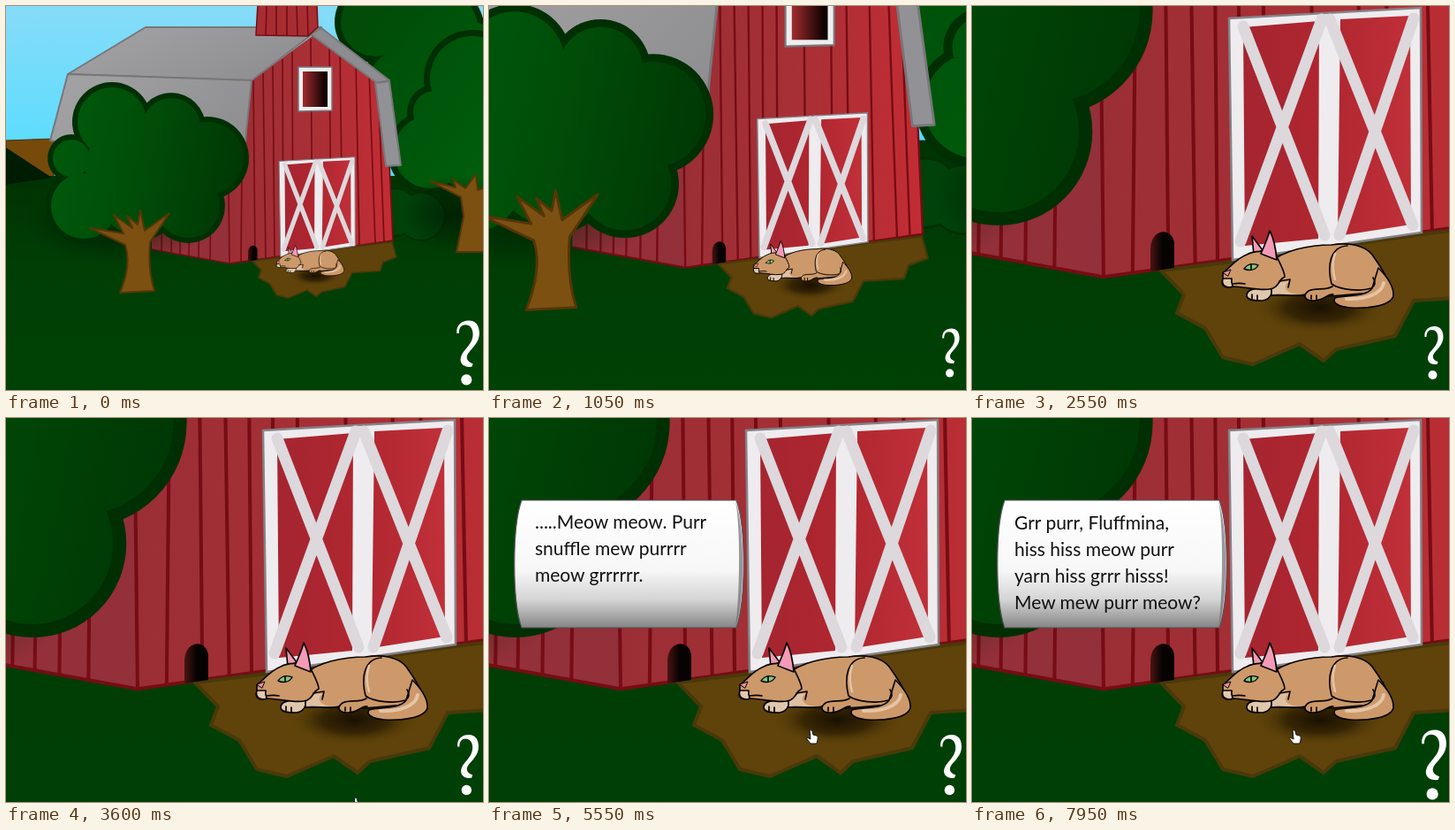
An HTML page that plays this animation: 540 by 434 pixels, repeating every 8 s.

```html
<!DOCTYPE html>
<html lang="en">
<head>
<meta charset="utf-8">
<title>Barn cat</title>
<style>
html, body { margin: 0; width: 100%; height: 100%; overflow: hidden; background: #003f05; }
svg { display: block; width: 100vw; height: 100vh; }
text { font: 21px Lato, "Open Sans", sans-serif; fill: #111; }
.ink { stroke: #080402; stroke-width: 1.7; stroke-linejoin: round; stroke-linecap: round; }
.seam { stroke: #760c14; stroke-width: 1.6; fill: none; }
.roof { stroke: #77777a; stroke-width: 2; stroke-linejoin: round; }
.wood { fill: #7b5011; stroke: #563507; stroke-width: 2; stroke-linejoin: round; }
</style>
</head>
<body>
<svg viewBox="0 0 540 434" preserveAspectRatio="none">
  <defs>
    <linearGradient id="sky" x2="0" y2="1"><stop stop-color="#86dcf8"/><stop offset="1" stop-color="#52dcff"/></linearGradient>
    <linearGradient id="grass" x2="0" y2="1"><stop stop-color="#003203"/><stop offset=".4" stop-color="#003e05"/><stop offset="1" stop-color="#004206"/></linearGradient>
    <linearGradient id="wall"><stop stop-color="#9b2e35"/><stop offset=".5" stop-color="#a83036"/><stop offset="1" stop-color="#c32c34"/></linearGradient>
    <linearGradient id="roof" x2="1" y2=".5"><stop stop-color="#a4a4a6"/><stop offset="1" stop-color="#8f8f92"/></linearGradient>
    <linearGradient id="panel"><stop stop-color="#a52530"/><stop offset=".5" stop-color="#b02630"/><stop offset="1" stop-color="#c03039"/></linearGradient>
    <linearGradient id="pane"><stop stop-color="#a22c2e"/><stop offset=".85" stop-color="#160303"/><stop offset="1" stop-color="#080000"/></linearGradient>
    <linearGradient id="hole"><stop stop-color="#4a1412"/><stop offset=".5" stop-color="#080303"/></linearGradient>
    <linearGradient id="leaf" gradientUnits="userSpaceOnUse" x1="50" x2="270" y1="150" y2="200"><stop stop-color="#005a0b"/><stop offset=".5" stop-color="#004c08"/><stop offset="1" stop-color="#003704"/></linearGradient>
    <linearGradient id="backLeaf" gradientUnits="userSpaceOnUse" x1="390" x2="550" y1="40" y2="160"><stop stop-color="#004c08"/><stop offset="1" stop-color="#005d0c"/></linearGradient>
    <radialGradient id="shade"><stop stop-color="#120b00" stop-opacity=".9"/><stop offset=".5" stop-color="#1c1200" stop-opacity=".6"/><stop offset="1" stop-color="#5f430a" stop-opacity="0"/></radialGradient>
    <radialGradient id="dim"><stop stop-color="#001a00" stop-opacity=".75"/><stop offset="1" stop-color="#001a00" stop-opacity="0"/></radialGradient>
    <linearGradient id="scroll" x2="0" y2="1"><stop stop-color="#fff"/><stop offset=".55" stop-color="#f7f7f7"/><stop offset=".78" stop-color="#d4d4d4"/><stop offset="1" stop-color="#858585"/></linearGradient>
  </defs>

  <g id="scene">
    <rect width="540" height="200" fill="url(#sky)"/>
    <path d="M0 152 54 150V198L0 161Z" fill="#764a0b" stroke="#4a2e06"/>
    <rect y="192" width="540" height="242" fill="url(#grass)"/>
    <path d="M0 160 52 194 0 202Z" fill="#001c02"/>

    <g id="backTrees"></g>
    <ellipse cx="508" cy="235" rx="60" ry="45" fill="url(#dim)"/>
    <path class="wood" d="M510 278 518 238 515 216 480 198 509 205 506 196 520 206 532 190 534 208 545 204V278Z"/>

    <path d="M165 190H262L253 291 165 275Z" fill="#93303a"/>
    <path id="front" d="M278 84 355 28 430 84 438 265 253 291 254 190Z" fill="url(#wall)"/>
    <path class="seam" id="seams"/>
    <path class="seam" d="M165 275 253 291 438 265 430 90M253 291 252 205"/>
    <path class="roof" fill="url(#roof)" d="M158 24H357L278 84 70 77Z"/>
    <path class="roof" fill="url(#roof)" d="M70 77 278 84 272 142 268 192 50 152Z"/>
    <path class="roof" fill="#8d8d91" d="M345 32 357 25 434 84 420 87Z"/>
    <path class="roof" fill="#929296" d="M418 87 434 85 447 180 430 181Z"/>
    <path d="M285-2H352L353 24 342 34 283 33Z" fill="#a72d33" stroke="#760c14" stroke-width="1.5"/>
    <path class="seam" d="M295 0 294 33M306 0V33M318 0V33M329 0 330 33M341 0 342 33"/>
    <path d="M331 69H369V118L331 119Z" fill="#eee" stroke="#77777a" stroke-width="1.5"/>
    <path d="M336 74H364V114H336Z" fill="url(#pane)"/>

    <!-- The foreground is laid out at full zoom. -->
    <g id="near">
      <path d="M214 299 240 326 232 347 264 364 284 397 318 405 371 382 398 401 412 388 479 373 500 333 580 328 589 302 627 288 615 245 509 258 295 289Z" fill="#5f430a" stroke="#49390a" stroke-width="4" stroke-linejoin="round"/>
      <path d="M202 300 202 274C203 250 228 250 229 269V296Z" fill="url(#hole)"/>
      <path d="M291 14 508 2 509 256 295 287Z" fill="#eeecee" stroke="#858287" stroke-width="2.5"/>
      <path d="M307 24 393 17 392 263 309 271ZM417 15 496 11 497 247 414 260Z" fill="url(#panel)"/>
      <path d="M307 23 399 259M396 15 304 266M405 15 499 248M500 14 416 259" stroke="#dcd8dc" stroke-width="13" stroke-linecap="round"/>
      <ellipse cx="394" cy="341" rx="76" ry="30" fill="url(#shade)"/>
      <g class="ink" fill="#cd996a">
        <path d="M338 290C352 276 382 270 407 270C426 267 444 270 453 281C463 295 470 307 474 316L452 324 405 328 338 327Z"/>
        <path d="M460 296C470 306 478 317 477 328C473 340 445 342 428 341C415 340 407 335 411 330C425 326 444 330 453 319Z"/>
        <path d="M424 331C444 332 464 326 466 313" fill="none" stroke="#e4c5a6" stroke-width="4"/>
        <path d="M425 271C405 272 402 294 407 314C416 321 440 323 452 319C458 315 456 310 454 307" fill="none"/>
        <path d="M411 280C407 291 409 303 411 309" fill="none" stroke="#e4c5a6" stroke-width="2.5"/>
        <path d="M408 317C400 322 389 318 381 322C373 328 378 333 386 333C398 334 402 325 409 326"/>
        <path d="M384 331V327M390 332V327" fill="none"/>
        <path d="M338 313 360 311C350 316 354 327 376 326L338 327Z" fill="#dfc0a2" stroke="none"/>
        <path d="M338 327C350 325 365 329 377 326" fill="none"/>
        <path d="M339 319C329 318 313 318 311 326C310 333 321 333 329 333C335 332 338 328 339 325Z" fill="#dfc7ae"/>
        <path d="M317 331V326M323 332V327" fill="none"/>
        <path d="M319 281 317 260 329 276Z" fill="#f39bb6"/>
        <path d="M284 302C292 295 300 285 311 281C322 275 338 277 345 283C349 292 354 300 354 306C347 309 348 318 337 320C325 322 307 317 296 317C288 320 281 316 284 310Z"/>
        <path d="M327 280C331 271 335 262 337 254C342 263 344 275 345 287Z" fill="#f39bb6"/>
        <path d="M284 308 294 308C293 314 296 317 295 317C287 320 282 315 284 308Z" fill="#e3c8ad"/>
        <path d="M284 301 293 298 290 305Z" fill="#e98d9c" stroke-width="1"/>
        <path d="M295 314C301 313 305 313 309 314" fill="none"/>
        <path d="M308 297C313 290 319 291 324 293C320 300 312 299 308 297Z" fill="#82c885" stroke-width="1.4"/>
        <path d="M316 292V298" fill="none"/>
        <path d="M348 311 360 309 358 318" fill="none"/>
      </g>
    </g>

    <ellipse cx="125" cy="245" rx="105" ry="48" fill="url(#dim)"/>
    <g id="tree"></g>
    <path class="wood" d="M129 324C137 305 140 285 135 270L95 251 133 257 122 236 143 251 137 237 149 247 152 231 157 254 185 234 163 267C161 290 163 306 168 322Z"/>
  </g>

  <g id="bubble">
    <path d="M37 93H280C291 122 291 207 280 237H37C26 207 26 122 37 93Z" fill="url(#scroll)" stroke="#55555a" stroke-width="1.2"/>
    <path d="M279 94C290 123 290 206 279 236C284 205 285 122 279 94Z" fill="#707074" opacity=".7"/>
    <g id="words"></g>
  </g>
  <path id="hand" d="M-2-7Q0-8 1-6L2-2 6-1Q8 0 7 4L6 8H-1L-5 3Q-6 0-3 2L-1 3Z" fill="#fff" stroke="#111"/>
  <g id="mark" fill="#fff">
    <path d="M-10-18C-11-26-5-30 1-30C8-30 11-25 11-18C11-10 5-5 1 0C-2 4-1 8 5 10L4 13C-5 14-9 8-5 1C-2-4 5-9 5-17C5-23 2-26-2-26C-6-26-8-23-8-18Z"/>
    <circle cx="-1" cy="25" r="5"/>
  </g>
</svg>
<script>
const el = id => document.getElementById(id);
const LOOP = 8000, ZOOM = 2.53, FOCUS = [321, 281];

const zoomTo = s => `translate(${FOCUS}) scale(${s}) translate(${FOCUS.map(v => -v)})`;
el('near').setAttribute('transform', zoomTo(1 / ZOOM));

// Foliage: overlapping round lobes with a dark rim.
function foliage(lobes, fill, rim) {
  const layer = (color, inset) => lobes.map(([x, y, r]) =>
    `<circle cx="${x}" cy="${y}" r="${r - inset}" fill="${color}"/>`).join('');
  return layer('#002f04', 0) + layer(fill, rim);
}
el('tree').innerHTML = foliage([
  [120, 131, 45], [187, 137, 39], [228, 172, 47], [206, 226, 42],
  [74, 172, 27], [88, 226, 43], [150, 185, 66], [150, 215, 50]
], 'url(#leaf)', 6);
el('backTrees').innerHTML =
  foliage([[418, 18, 46], [480, 30, 62], [455, 95, 55], [520, 70, 60]], 'url(#backLeaf)', 7) +
  foliage([[528, 82, 55], [485, 120, 31], [480, 165, 48], [530, 155, 60]], 'url(#backLeaf)', 7) +
  foliage([[440, 233, 28], [470, 238, 28]], '#00420a', 2);

// Board seams: [top x, top y, bottom x, bottom y].
const base = x => 291 - (x - 253) * .14;
const seams = [[280, 84, 282], [291, 76, 294], [267, 190, 266], [302, 68, 304], [313, 60, 314],
  [324, 52, 325], [345, 37, 347], [366, 38, 368], [378, 47, 381], [396, 60, 400],
  [411, 72, 418], [421, 80, 428]].map(([x, y, b]) => `M${x} ${y}L${b} ${base(b)}`);
const sideSeams = [176, 187, 197, 207, 218, 231].map(x => `M${x + 1} 200L${x} ${275 + (x - 165) * .18}`);
el('seams').setAttribute('d', seams.concat(sideSeams).join(''));

const speeches = [
  { from: 5500, x: 52, y: 125, lines: ['.....Meow meow. Purr', 'snuffle mew purrrr', 'meow grrrrrr.'] },
  { from: 7700, x: 48, y: 126, lines: ['Grr purr, Fluffmina,', 'hiss hiss meow purr', 'yarn hiss grrr hisss!', 'Mew mew purr meow?'] }
];
el('words').innerHTML = speeches.map(({ x, y, lines }) => '<g>' + lines.map((line, i) =>
  `<text x="${x}" y="${y + 30 * i}">${line}</text>`).join('') + '</g>').join('');
const speechGroups = [...el('words').children];

const tracks = {
  zoom: [[650, 1], [2000, ZOOM]],
  mark: [[0, 73], [150, 79], [1050, 55], [1550, 64], [2100, 79], [2550, 60], [3050, 55], [4050, 79],
    [4650, 61], [5000, 55], [6000, 79], [6550, 64], [6950, 55], [7950, 79]],
  handX: [[3500, 400], [4400, 367], [4650, 367], [5400, 365]],
  handY: [[3500, 445], [4400, 367], [4650, 367], [5400, 360]]
};
function valueAt(track, t) {
  const next = track.findIndex(([time]) => time > t);
  if (next === 0) return track[0][1];
  if (next < 0) return track[track.length - 1][1];
  const [t0, a] = track[next - 1], [t1, b] = track[next];
  return a + (b - a) * (t - t0) / (t1 - t0);
}

const start = performance.now();
function draw() {
  const t = Math.floor((performance.now() - start) % LOOP / 50) * 50;
  const at = name => valueAt(tracks[name], t);
  el('scene').setAttribute('transform', zoomTo(at('zoom')));
  el('mark').setAttribute('transform', `translate(522.5 392) scale(${at('mark') / 60})`);
  el('hand').setAttribute('transform', `translate(${at('handX')} ${at('handY')})`);
  const current = speeches.filter(s => t >= s.from).length - 1;
  el('bubble').style.display = current < 0 ? 'none' : '';
  speechGroups.forEach((g, i) => g.style.display = i === current ? '' : 'none');
  requestAnimationFrame(draw);
}
draw();
</script>
</body>
</html>
```
